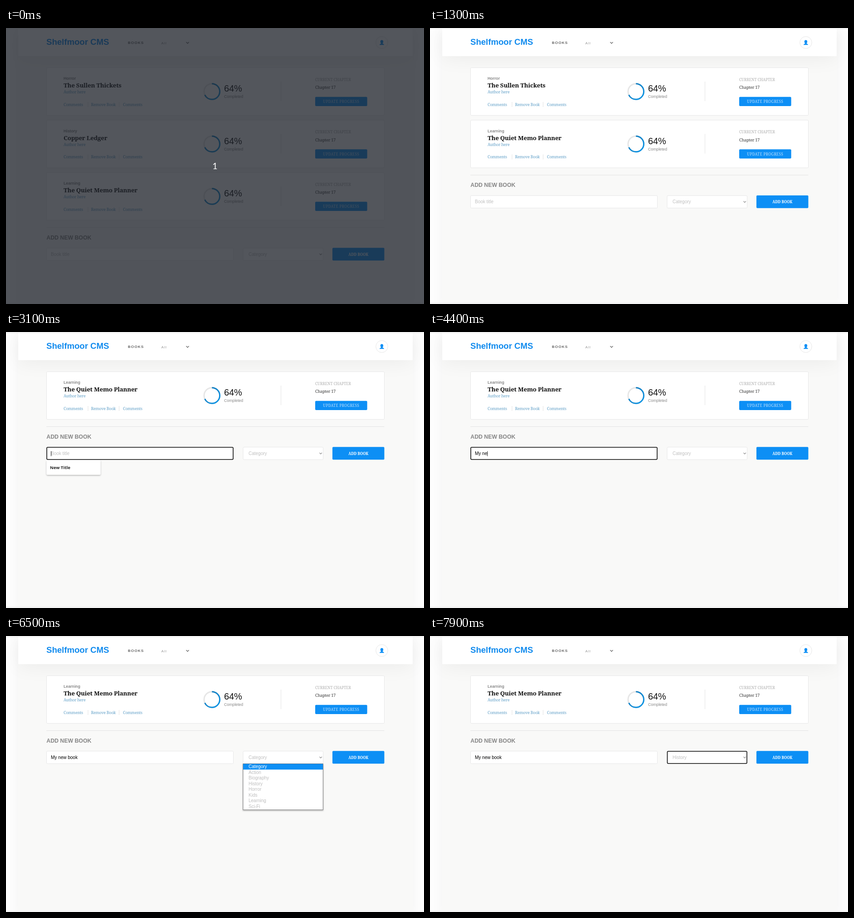
An HTML page for the animation above (8000 ms loop, 922x608 px).

```html
<!DOCTYPE html>
<html lang="en">
<head>
<meta charset="utf-8">
<title>Book list</title>
<style>
  html, body { margin: 0; width: 100%; height: 100%; overflow: hidden; background: #fdfdfd; }
  #stage { position: relative; width: 922px; height: 608px; overflow: hidden; background: #fdfdfd; }
  #stage > * { position: absolute; }
  .panel { left: 27px; top: 2px; width: 870px; height: 620px; background: #f9f9f8; box-shadow: 0 0 26px rgba(0,0,0,.045); }
  .header { left: 27px; top: 2px; width: 870px; height: 60px; background: #fff; box-shadow: 0 8px 42px rgba(0,0,0,.05); }
  .topline { left: 0; top: 0; width: 922px; height: 1px; background: #fff; border-bottom: 1px solid #dedede; }
  .bottom { left: 0; top: 603px; width: 922px; height: 5px; background: linear-gradient(#f9f9f800, #f1f1f1); }
  svg { left: 0; top: 0; }
  text { font-family: "Liberation Sans", Arial, sans-serif; white-space: pre; }
  .slab, .link, .chapter, .label, .update, .add { font-family: "Noto Serif", serif; }
  .logo { font-size: 18.6px; font-weight: 700; fill: #118bee; }
  .nav { font-size: 8.1px; letter-spacing: 1.35px; fill: #1c1c1c; }
  .filter { font-size: 8.1px; letter-spacing: 1.2px; fill: #949494; }
  .genre { font-size: 8.7px; font-weight: 700; fill: #878787; }
  .slab { font-size: 13.3px; font-weight: 700; letter-spacing: -.2px; fill: #111; }
  .link { font-size: 8.8px; font-weight: 300; letter-spacing: -.23px; fill: #62a0c8; }
  .percent { font-size: 19.9px; fill: #121212; }
  .done { font-size: 8.7px; fill: #878787; }
  .label { font-size: 8.3px; font-weight: 300; fill: #acacac; }
  .chapter { font-size: 9.3px; font-weight: 300; letter-spacing: -.3px; fill: #3c3c3c; }
  .update { font-size: 8px; font-weight: 300; letter-spacing: .4px; fill: #c8e4fc; }
  .add { font-size: 8px; font-weight: 700; fill: #fff; }
  .heading { font-size: 12.3px; font-weight: 700; fill: #858585; }
  .field { font-size: 10px; }
  .hint { fill: #c0c0c0; }
  .suggest { font: 600 9.5px "Noto Sans", sans-serif; fill: #222; }
  .count { font: 19.5px Lato, sans-serif; fill: #fff; }
  .box { fill: #fff; stroke: #e7e7e7; }
  .focus { fill: #fff; stroke: #0a0a0a; stroke-width: 1.6; }
  .blue { fill: #0d8ff5; }
  .rule { stroke: #e3e3e3; fill: none; }
  .chevron { fill: none; stroke-width: 1.4; }
  .ring { fill: none; stroke-width: 3; }
</style>
</head>
<body>
<div id="stage">
  <div class="panel"></div>
  <div class="header"></div>
  <div class="topline"></div>
  <div class="bottom"></div>
  <svg width="922" height="608" viewBox="0 0 922 608">
    <defs>
      <linearGradient id="arc" x1="1" y1="0" x2="0" y2="1">
        <stop offset="0" stop-color="#1a78b4"/>
        <stop offset="1" stop-color="#0b97ea"/>
      </linearGradient>
      <filter id="shadow" x="-20%" y="-20%" width="140%" height="150%">
        <feDropShadow dx="0" dy="1.5" stdDeviation="1.6" flood-opacity=".32"/>
      </filter>
    </defs>
    <text class="logo" x="89" y="37">Shelfmoor CMS</text>
    <text class="nav" x="269" y="35">BOOKS</text>
    <text class="filter" x="342.5" y="35.5">All</text>
    <path class="chevron" d="M397.5 31l3 3 3-3" stroke="#6a6a6a"/>
    <circle class="box" cx="829" cy="32" r="13.2"/>
    <path class="blue" d="M829 26.5c2 0 3.2 1.5 3.2 3.4 0 1.8-.8 3.1-1.6 3.8 0 1.2 3.4 1 3.4 3.6h-10c0-2.6 3.4-2.4 3.4-3.6-.8-.7-1.6-2-1.6-3.8 0-1.9 1.2-3.4 3.2-3.4z"/>
    <g id="cards"></g>
    <g id="form"></g>
    <g id="overlay">
      <rect width="922" height="608" fill="rgba(30,34,42,.76)"/>
      <text class="count" x="461" y="311" text-anchor="middle">1</text>
    </g>
  </svg>
</div>
<script>
const LOOP = 8000;
const BOOKS = [
  ['Horror', 'The Sullen Thickets'],
  ['History', 'Copper Ledger'],
  ['Learning', 'The Quiet Memo Planner']
];
const CATEGORIES = ['Category', 'Action', 'Biography', 'History', 'Horror', 'Kids', 'Learning', 'Sci-Fi'];

// Each step changes only the listed parts of the state.
const STEPS = [
  [0, { books: BOOKS, title: '', focus: '', category: 0, dark: true }],
  [100, { dark: false }],
  [1300, { books: [BOOKS[0], BOOKS[2]] }],
  [2400, { books: [BOOKS[2]] }],
  [3100, { focus: 'title', caret: true, suggest: 1 }],
  [3800, { title: 'M' }],
  [3900, { suggest: .5 }],
  [4000, { suggest: 0 }],
  [4200, { title: 'My' }],
  [4300, { title: 'My ' }],
  [4400, { title: 'My ne' }],
  [4500, { title: 'My new' }],
  [4600, { title: 'My new ' }],
  [4900, { title: 'My new b' }],
  [5000, { title: 'My new bo' }],
  [5100, { title: 'My new boo' }],
  [5300, { title: 'My new book' }],
  [6000, { caret: false }],
  [6500, { focus: '', open: true, hover: 0 }],
  [6900, { hover: 2 }],
  [7000, { hover: 3 }],
  [7100, { hover: 4 }],
  [7500, { hover: 3 }],
  [7900, { open: false, focus: 'category', category: 3 }]
];

const byId = id => document.getElementById(id);
const pen = document.createElement('canvas').getContext('2d');
pen.font = '10px "Liberation Sans", Arial, sans-serif';

const text = (cls, x, y, str, extra = '') => `<text class="${cls}" x="${x}" y="${y}" ${extra}>${str}</text>`;
const rect = (cls, x, y, w, h, extra = '') =>
  `<rect class="${cls}" x="${x}" y="${y}" width="${w}" height="${h}" rx="2" ${extra}/>`;
const ring = extra => `<circle class="ring" cx="454.2" cy="140" r="17.3" ${extra}/>`;
const centered = 'text-anchor="middle"';

function card([genre, title], i) {
  return `<g transform="translate(0 ${i * 115.5})">
    ${rect('box', 89.5, 87.5, 745, 105)}
    ${text('genre', 127, 114, genre)}
    ${text('slab', 127, 131, title)}
    ${text('link', 127, 144, 'Author here')}
    ${text('link', 127, 171.5, 'Comments')}
    ${text('link', 187.5, 171.5, 'Remove Book')}
    ${text('link', 258, 171.5, 'Comments')}
    <path class="rule" d="M181 163v11M249.5 163v11"/>
    ${ring('stroke="#e6e6e6"')}
    ${ring('stroke="url(#arc)" pathLength="100" stroke-dasharray="68 100" transform="rotate(-90 454.2 140)"')}
    ${text('percent', 481, 140, '64%')}
    ${text('done', 481, 154, 'Completed')}
    <path class="rule" d="M606.5 118v43"/>
    ${text('label', 682, 116.5, 'CURRENT CHAPTER')}
    ${text('chapter', 682, 134, 'Chapter 17')}
    ${rect('blue', 682, 151.7, 114.7, 20.3)}
    ${text('update', 739.3, 165.3, 'UPDATE PROGRESS', centered)}
  </g>`;
}

function inputBox(focused, x, w) {
  return focused ? rect('focus', x + .5, 51.5, w - 1, 26.7) : rect('box', x, 51.2, w, 27.5);
}

function titleField(s) {
  const focused = s.focus === 'title';
  const caretX = 99.5 + pen.measureText(s.title).width;
  return inputBox(focused, 89.5, 412)
    + (s.title ? text('field', 99, 68.3, s.title) : text('field hint', 99, 68.3, 'Book title'))
    + (focused && s.caret ? `<path d="M${caretX} 60v11" stroke="#222"/>` : '')
    + (focused && s.suggest ? `<g opacity="${s.suggest}">
        ${rect('', 89.5, 80, 119, 32, 'fill="#fff" filter="url(#shadow)"')}
        ${text('suggest', 97, 99.3, 'New Title')}</g>` : '');
}

function menu(hover) {
  const row = 12.55, top = 79.2;
  const rows = CATEGORIES.map((name, i) => {
    const on = i === hover;
    return (on ? `<rect class="blue" x="523" y="${top + i * row}" width="176" height="${row}"/>` : '')
      + text('field', 535, 88.6 + i * row, name, `fill="${on ? '#fff' : '#bdbdbd'}"`);
  });
  return '<rect x="522.9" y="79" width="176.4" height="101.4" fill="#fff" stroke="#777" filter="url(#shadow)"/>'
    + rows.join('');
}

function form(s) {
  return `<path class="rule" d="M89 6h745.5"/>
    ${text('heading', 89.3, 32.2, 'ADD NEW BOOK')}
    ${titleField(s)}
    ${inputBox(s.focus === 'category', 523, 176.5)}
    ${text('field hint', 535, 68.3, CATEGORIES[s.category])}
    <path class="chevron" d="M691.5 63.5l2.7 2.7 2.7-2.7" stroke="#999"/>
    ${rect('blue', 720, 50.8, 114.5, 28)}
    ${text('add', 777.3, 68.3, 'ADD BOOK', centered)}
    ${s.open ? menu(s.hover) : ''}`;
}

function render(step) {
  const s = Object.assign({}, ...STEPS.slice(0, step + 1).map(([, part]) => part));
  byId('cards').innerHTML = s.books.map(card).join('');
  byId('form').setAttribute('transform', `translate(0 ${87 + s.books.length * 115.5})`);
  byId('form').innerHTML = form(s);
  byId('overlay').style.display = s.dark ? '' : 'none';
}

const start = performance.now();
let shown = -1;
function tick() {
  const t = (performance.now() - start) % LOOP;
  const step = STEPS.filter(([at]) => at <= t).length - 1;
  if (step !== shown) render(shown = step);
  requestAnimationFrame(tick);
}
tick();
</script>
</body>
</html>
```
